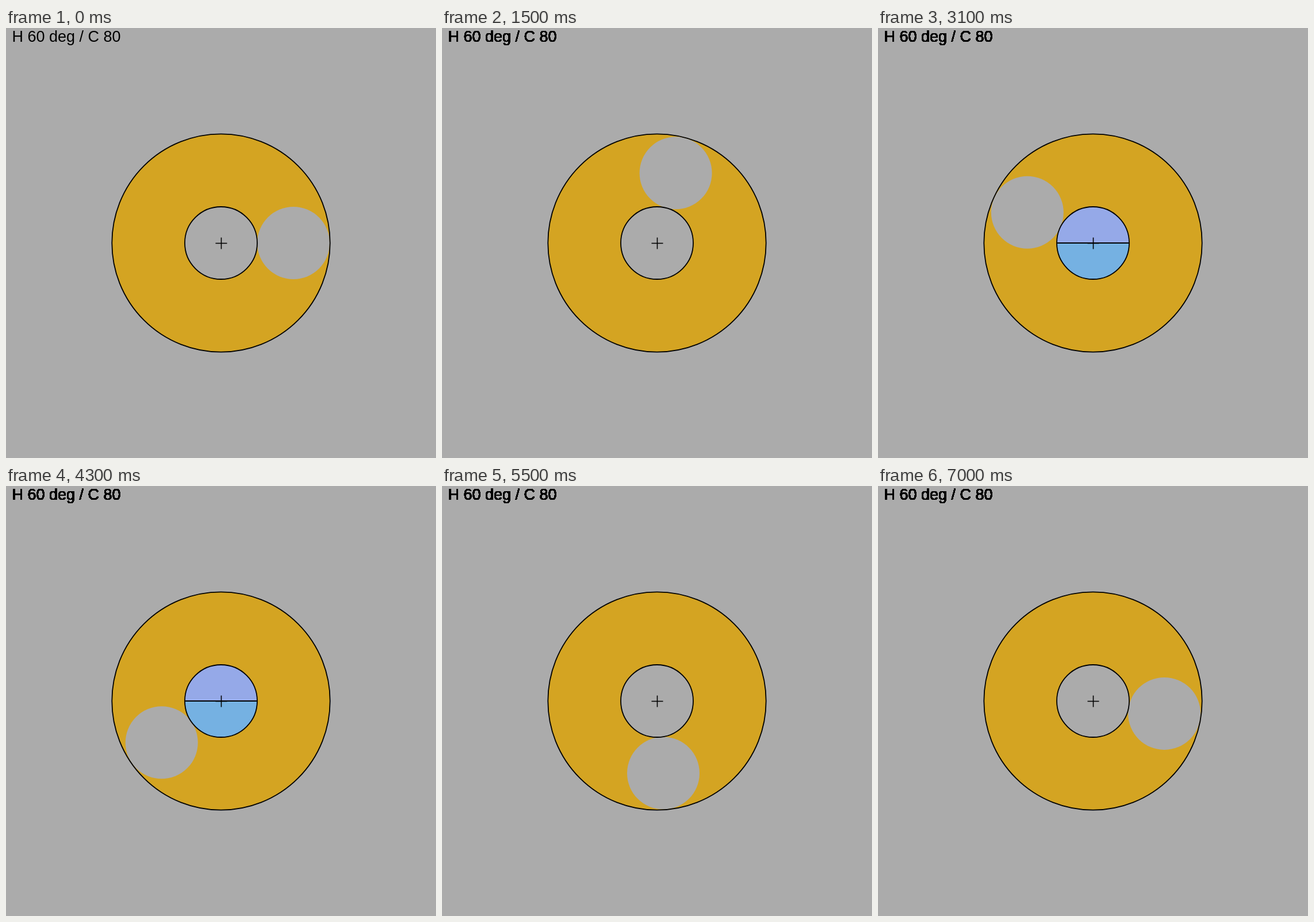
Recreate the animation shown at these times as an HTML page with a canvas. Size 748 by 748 pixels, loop 7100 ms.

```html
<!DOCTYPE html>
<html lang="en">
<head>
<meta charset="utf-8">
<title>Rotating gap on a colour ring</title>
<style>
  html, body { margin: 0; width: 100%; height: 100%; overflow: hidden; background: #ababab; }
  canvas { display: block; }
</style>
</head>
<body>
<canvas id="stage" width="748" height="748"></canvas>
<script>
const ctx = document.getElementById('stage').getContext('2d');
const STEP_MS = 100, STEPS = 71, STEP_DEG = 5;
const CENTER = 374, OUTER = 189.7, INNER = 63, ORBIT = 126;
const GRAY = '#ababab', RING = '#d4a422', UPPER = '#95a9e8', LOWER = '#75b1e2';
const LABEL = 'H 60 deg / C 80';

function disc(x, y, r, fill, from = 0, to = 2 * Math.PI) {
  ctx.beginPath();
  ctx.arc(x, y, r, from, to);
  ctx.fillStyle = fill;
  ctx.fill();
}

function outline(r) {
  ctx.beginPath();
  ctx.arc(CENTER, CENTER, r, 0, 2 * Math.PI);
  ctx.stroke();
}

function line(x1, y1, x2, y2) {
  ctx.beginPath();
  ctx.moveTo(x1, y1);
  ctx.lineTo(x2, y2);
  ctx.stroke();
}

function draw(step) {
  const deg = step * STEP_DEG;
  const angle = deg * Math.PI / 180;
  const split = deg >= 135 && deg <= 225;

  ctx.fillStyle = GRAY;
  ctx.fillRect(0, 0, 748, 748);

  disc(CENTER, CENTER, OUTER, RING);
  disc(CENTER + ORBIT * Math.cos(angle), CENTER - ORBIT * Math.sin(angle), INNER, GRAY);

  ctx.strokeStyle = '#000';
  ctx.lineWidth = 1.8;
  if (split) {
    disc(CENTER, CENTER, INNER, UPPER, Math.PI, 2 * Math.PI);
    disc(CENTER, CENTER, INNER, LOWER, 0, Math.PI);
    line(CENTER - INNER, CENTER, CENTER + INNER, CENTER);
  } else {
    disc(CENTER, CENTER, INNER, GRAY);
  }
  outline(OUTER);
  outline(INNER);

  ctx.lineWidth = 1.6;
  line(364.5, 374.5, 384.5, 374.5);
  line(374.5, 364.5, 374.5, 384.5);

  // The label is painted over itself each step, so its soft edges darken.
  ctx.font = '27px "Liberation Sans", Arial, sans-serif';
  ctx.fillStyle = '#000';
  for (let i = 0; i <= step; i++) ctx.fillText(LABEL, 10.5, 24);
}

const start = performance.now();
let shown = -1;

function tick() {
  const elapsed = Math.max(0, performance.now() - start);
  const step = Math.floor(elapsed / STEP_MS) % STEPS;
  if (step !== shown) draw(shown = step);
  requestAnimationFrame(tick);
}
tick();
</script>
</body>
</html>
```
